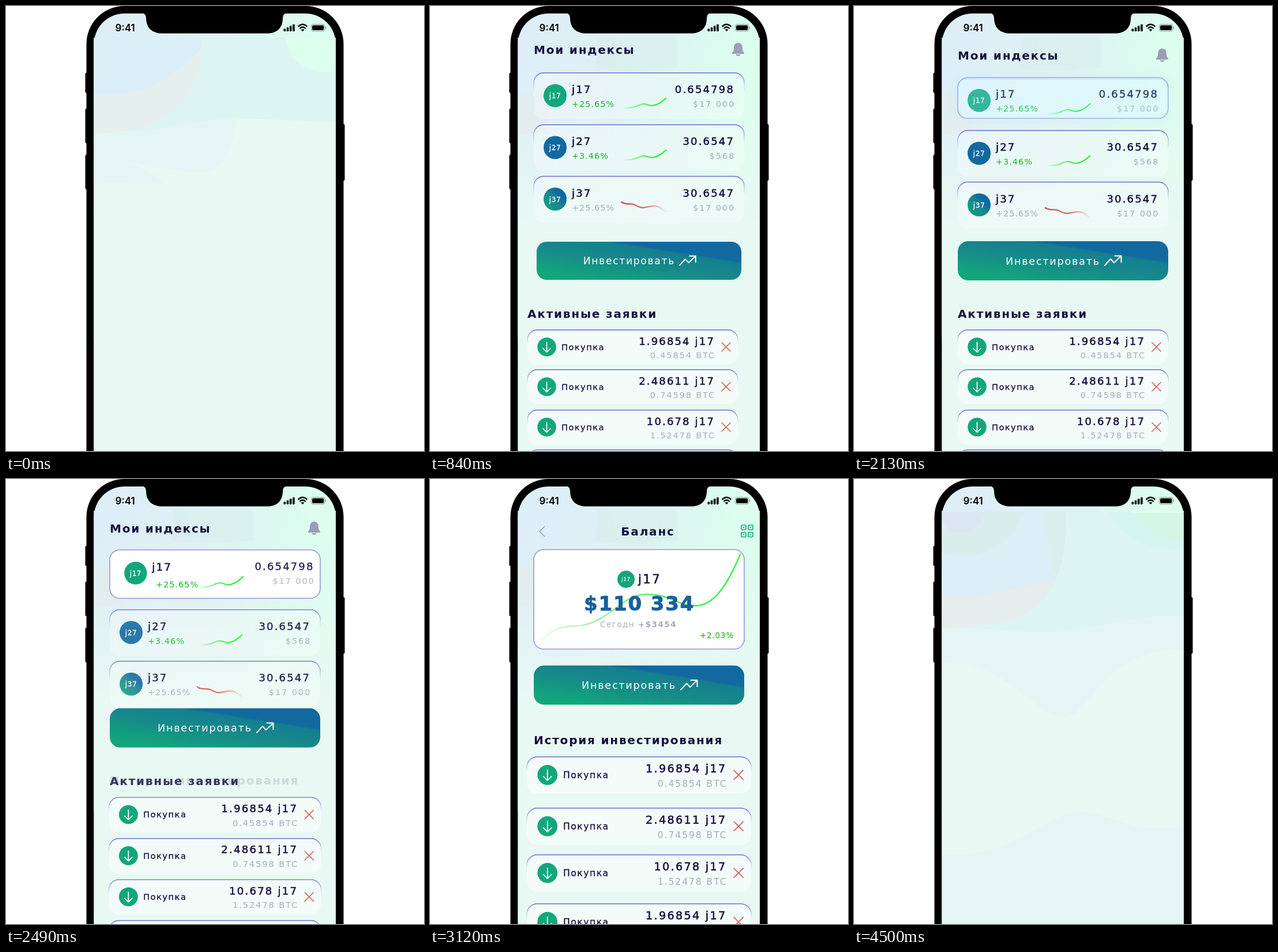
Write an HTML page that moves like this. It is 725 by 772 pixels and loops after 4620 ms.

```html
<!DOCTYPE html>
<html lang="ru">
<head>
<meta charset="utf-8">
<title>Индексы</title>
<style>
html, body { margin: 0; width: 100%; height: 100%; overflow: hidden; background: #fff; }
svg { display: block; width: 725px; height: 772px; }
text { font-family: "DejaVu Sans", sans-serif; fill: #160f40; }
.h { font-weight: 700; font-size: 20px; letter-spacing: .09em; }
.m { font-size: 18px; letter-spacing: .12em; stroke: #160f40; stroke-width: .5px; }
.s { font-size: 14.6px; letter-spacing: .1em; stroke: #160f40; stroke-width: .3px; }
.l { font-size: 14.6px; letter-spacing: .125em; fill: #a5abb9; }
.p { font-size: 14.4px; letter-spacing: .07em; }
.b { font-size: 17.6px; letter-spacing: .1em; fill: #fff; }
.t { font-size: 12px; letter-spacing: .05em; fill: #fff; stroke: #fff; stroke-width: .3px; text-anchor: middle; }
.big { font-size: 34px; font-weight: 700; letter-spacing: .055em; fill: #17609c; stroke: #17609c; stroke-width: .9px; }
.clock { font: 600 17px Inter, sans-serif; fill: #000; }
.e { text-anchor: end; }
.line { fill: none; stroke-linecap: round; stroke-linejoin: round; }
</style>
</head>
<body>
<svg id="stage" viewBox="0 0 725 772"></svg>
<script>
const LOOP = 4620, STEP = 30;
const GREEN = '#12a77a', BLUE = '#1169a0';
const names = ['j17', 'j27', 'j37'];

const txt = (x, y, s, cls, more = '') => `<text x="${x}" y="${y}" class="${cls}" ${more}>${s}</text>`;
const path = (d, fill) => `<path d="${d}" fill="${fill}"/>`;
const line = (d, color, w, more = '') => `<path class="line" d="${d}" stroke="${color}" stroke-width="${w}" ${more}/>`;
const rect = (x, y, w, h, r, fill, more = '') =>
  `<rect x="${x}" y="${y}" width="${w}" height="${h}" rx="${r}" fill="${fill}" ${more}/>`;
const oval = (x, y, rx, ry, fill) => `<ellipse cx="${x}" cy="${y}" rx="${rx}" ry="${ry}" fill="${fill}"/>`;
const grad = (id, coords, stops, units = 'objectBoundingBox') =>
  `<linearGradient id="${id}" gradientUnits="${units}" ${coords}>` +
  stops.map(([o, c, a = 1]) => `<stop offset="${o}" stop-color="${c}" stop-opacity="${a}"/>`).join('') +
  '</linearGradient>';

const defs = `<defs>
  <clipPath id="screen"><rect x="152.5" y="55" width="419.5" height="717"/></clipPath>
  ${grad('across', 'x1="0" x2="1"', [[0, '#dceef8'], [.3, '#dfeff6'], [.55, '#dcf3f1'], [.8, '#dcfaf0'], [1, '#dcffee']])}
  ${grad('down', 'x1="0" x2="0" y1="0" y2="1"', [[0, '#e8f8f3', 0], [.25, '#e8f8f3', .15], [.62, '#e8f8f3', 1]])}
  ${grad('edge', 'x1="0" x2="0" y1="0" y2="1"', [[0, '#6b70cc'], [.12, '#8589d6', .9], [.4, '#a5a8e4', 0]])}
  ${grad('cta', 'x1="0" y1="68" x2="19.7" y2="-55"', [[0, '#11a878'], [.14, '#12a57b'], [.46, '#17898a'], [.69, '#147f90'], [.72, BLUE], [1, BLUE]], 'userSpaceOnUse')}
  ${grad('duo', 'x1="0" y1="1" x2="1" y2="0"', [[0, GREEN], [.45, '#19888c'], [.7, BLUE], [1, BLUE]])}
  ${grad('rise', 'x1="0" x2="1"', [[0, '#3ee84a', .1], [.35, '#3ee84a', .65], [.75, '#2df53a'], [1, '#2df53a']])}
  ${grad('fall', 'x1="0" x2="1"', [[0, '#d4524f'], [.5, '#d4625f', .9], [1, '#d4625f', .1]])}
  <radialGradient id="soft"><stop offset=".9868" stop-color="#fff"/><stop offset="1" stop-color="#fff" stop-opacity="0"/></radialGradient>
  <mask id="sweep" maskUnits="userSpaceOnUse" x="0" y="0" width="725" height="772">
    <circle id="disc" cx="2600" cy="430" r="2175" fill="url(#soft)"/>
  </mask>
  <filter id="glow" x="-10%" y="-30%" width="120%" height="160%"><feGaussianBlur stdDeviation="4"/></filter>
</defs>`;

const phone = [[137.5, 116, 35], [137.5, 178, 60], [137.5, 258, 60], [580, 205, 98]]
  .map(([x, y, h]) => rect(x, y, 7.5, h, 2, '#000')).join('') +
  rect(139.5, 0, 446, 900, 66, '#000') +
  rect(152.5, 13, 419.5, 900, 53, 'url(#across)') +
  path('M235 12Q243 13 243 21C243 38 254 47.5 270 47.5H453C470 47.5 480 38 480 21Q480 13 488 12Z', '#000');

const status = txt(189.5, 43.5, '9:41', 'clock') +
  [0, 1, 2, 3].map(i => rect(481.5 + i * 5.2, 39.5 - i * 2.6, 3.6, 4.5 + i * 2.6, 1, '#000')).join('') +
  line('M507.5 35Q514.5 28.5 521.5 35', '#000', 2.6, 'stroke-linecap="butt"') +
  line('M510.3 38.4Q514.5 34.5 518.7 38.4', '#000', 2.5) +
  path('M511.8 41.2Q514.5 39 517.2 41.2L514.5 44Z', '#000') +
  rect(529.3, 31.8, 23.6, 12, 3.6, 'none', 'stroke="#000" stroke-opacity=".4"') +
  rect(531, 33.5, 20.2, 8.6, 2, '#000') + path('M554.3 35.8Q557 37.8 554.3 39.8Z', '#777');

const backdrop = rect(152, 55, 421, 717, 0, '#e8f8f3') +
  rect(152, 55, 421, 520, 0, 'url(#across)') + rect(152, 55, 421, 520, 0, 'url(#down)') +
  path('M290 55H430V107H410Q350 116 288 108Z', 'rgba(212,236,230,.4)') +
  path('M152 153H205V222H152Z', 'rgba(232,236,234,.55)');

const calm = rect(152, 57, 421, 715, 0, '#e8f8f2') +
  path('M152 221C230 222 310 196 400 195C396 240 376 278 352 288C310 292 260 275 208 274C240 280 262 294 275 309Q220 304 152 307Z', '#e5f5f7') +
  path('M152 57H573V200C500 201 450 194 395 195C330 199 280 214 230 216L152 222Z', '#dcf5f2') +
  path('M152 57H340C342 150 290 222 152 221Z', '#e5efee') +
  path('M152 57H340V71C285 132 235 160 152 153Z', '#dceef7') +
  oval(554, 52, 68, 63, '#dcffee') +
  rect(152, 55, 153, 3, 0, '#dceef7') + rect(305, 55, 100, 2, 0, '#d9efea') + rect(405, 55, 80, 2, 0, '#d4f4ee');

const dusk = rect(152, 57, 421, 715, 0, '#e5f5f6') +
  path('M152 318C270 316 315 414 364 414C408 414 430 292 573 296V604C470 615 450 578 390 578C330 578 290 656 152 652Z', '#e8f8f2') +
  path('M152 57H573V237C460 236 420 266 325 266C280 266 240 258 152 259Z', '#dcf5f2') +
  path('M152 57H368C368 200 330 259 152 259Z', '#e5eeed') +
  path('M152 57H333C333 100 338 140 353 174C290 188 240 205 152 203Z', '#dceef6') +
  path('M333 57H368Q368 130 352 168Q333 120 333 57Z', '#d8efeb') +
  path('M152 57H295C282 108 220 145 152 127Z', '#d9eeec') +
  path('M153 57H226C220 100 165 103 153 73Z', '#dce6f0') +
  path('M443 57H573V120C510 128 464 100 443 57Z', '#d5f5ee') +
  path('M488 57H573V102C535 108 502 86 488 57Z', '#d5f6e4') +
  rect(480, 55, 93, 4, 0, '#dcffee') + rect(152, 55, 180, 2, 0, '#dceef7');

const bell = path('M534.5 74C540 74 542 78 542 83C542 88 543 89 545 91V93H524V91C526 89 527 88 527 83C527 78 529 74 534.5 74ZM530.5 94H538.5Q537.5 97 534.5 97T530.5 94Z', '#9b9fb3');

// sparkline of the first card and the chart it grows into, as x, y pairs
const small = [337, 187, 343, 187, 349, 187, 355, 185, 362, 183, 366, 179, 372, 180, 379, 181, 383, 185, 390, 182, 397, 180, 403, 176, 409, 170];
const large = [191, 287, 205, 262, 225, 256, 252, 255, 310, 253, 330, 200, 376, 200, 418, 200, 428, 220, 460, 220, 492, 220, 515, 185, 538, 131];
const curvePath = v => `M${v[0]} ${v[1]}C${v.slice(2).join(' ')}`;

const cardBox = rect(180, 0, 365, 80, 17, 'rgba(255,255,255,.27)', 'stroke="url(#edge)" stroke-width="1.5"');
const badge = (name, fill) => `<circle r="20" fill="${fill}"/>` + txt(0, 4.5, name, 't');
const card = (id, name, fill, pct, pctColor, sum, usd, spark) => `<g id="${id}">${cardBox}
  <g transform="translate(217 39.5)">${badge(name, fill)}</g>
  ${txt(246, 35, name, 'm')}${txt(246, 59, pct, 'p', `style="fill:${pctColor}"`)}
  ${txt(528, 35, sum, 'm e')}${txt(529, 59, usd, 'l e')}${spark}</g>`;
const riseLine = line(curvePath(small), 'url(#rise)', 2.4, 'transform="translate(0 -126)"');
const fallLine = line('M332 44.5C338 50 346 46 354 49C362 53 366 55 372 54C380 53 388 50 394 52C400 54 404 58 408 61', 'url(#fall)', 2.4);

const row = i => `<g id="row${i}">
  ${rect(0, 0, 365, 60, 17, 'rgba(255,255,255,.45)', 'stroke="url(#edge)" stroke-width="1.4"')}
  <circle cx="33.5" cy="29.5" r="16.3" fill="${GREEN}"/>
  ${line('M33.5 21.5V38M27 32L33.5 38.5L40 32', '#fff', 1.7)}
  ${txt(59, 34.5, 'Покупка', 's')}
  ${txt(325, 25.5, ['1.96854', '2.48611', '10.678', '1.96854'][i] + ' ' + names[0], 'm e')}
  ${txt(326, 49, ['0.45854', '0.74598', '1.52478', '0.45854'][i] + ' BTC', 'l e')}
  ${line('M337 22L352 37M352 22L337 37', '#d65f5c', 1.6)}</g>`;

const first = `<g id="first">
  <rect id="box" x="180" width="365" rx="17" fill="rgba(255,255,255,.27)" stroke="url(#edge)" stroke-width="1.5"/>
  <rect id="sheetBox" x="180" width="365" rx="17" fill="#fff" stroke="#9896d8" stroke-width="1.6"/>
  <path id="curve" class="line" stroke="url(#rise)" stroke-width="2.4"/>
  <g id="badge">${badge(names[0], GREEN)}</g>
  <g id="label">${txt(0, 6.5, names[0], 'm')}</g>
  <g id="pct">${txt(0, 5, '+25.65%', 'p', 'style="fill:#12b81b"')}</g>
  <g id="pct2">${txt(0, 5, '+2.03%', 'p', 'style="fill:#2fc436;font-size:13.3px;stroke:#2fc436;stroke-width:.3px"')}</g>
  <g id="sums">${txt(528, 161, '0.654798', 'm e')}${txt(529, 185, '$17 000', 'l e')}</g>
  <g id="total">${txt(267, 228, '$110 334', 'big')}
    ${txt(295, 257, 'Сегодн <tspan font-weight="700">+$3454</tspan>', 'l', 'style="font-size:13.5px;letter-spacing:.11em"')}</g>
  <g id="press">
    <rect x="174" y="121" width="377" height="79" rx="21" fill="none" stroke="#b6eef6" stroke-width="7" opacity=".5" filter="url(#glow)"/>
    <rect x="179.5" y="126.5" width="365" height="68" rx="16" fill="rgba(156,236,250,.6)" stroke="#83aede" stroke-width="1.6"/>
  </g></g>`;

const square = (x, y) => rect(x, y, 8, 8, 1.5, 'none', `stroke="${GREEN}" stroke-width="1.7"`) + rect(x + 3, y + 3, 2, 2, 0, GREEN);

document.getElementById('stage').innerHTML = defs + phone + `
<g clip-path="url(#screen)">
  ${backdrop}
  <g id="calm">${calm}</g>
  <g id="app">
    <g id="top">
      <g id="head">${txt(180, 93, 'Мои индексы', 'h')}${bell}</g>
      ${card('second', names[1], BLUE, '+3.46%', '#12b81b', '30.6547', '$568', riseLine)}
      ${card('third', names[2], 'url(#duo)', '+25.65%', '#a5abb9', '30.6547', '$17 000', fallLine)}
      ${first}
    </g>
    <g id="list">
      <g id="active">${txt(180, 0, 'Активные заявки', 'h')}</g>
      <g id="history">${txt(180, 0, 'История инвестирования', 'h')}</g>
      ${[0, 1, 2, 3].map(row).join('')}
    </g>
    <g id="cta">${rect(0, 0, 365, 68, 18, 'url(#cta)')}
      ${txt(83, 40.5, 'Инвестировать', 'b')}
      ${line('M255 42L265 31L271 37.5L283.5 25.5M272.5 25.5H283.5V36.5', '#fff', 2)}</g>
    <g id="detail">${txt(378, 98, 'Баланс', 'h', 'text-anchor="middle"')}
      ${line('M198.5 82.5L190 91L198.5 99.5', '#9094a6', 1.4)}
      ${[[540, 80], [552, 80], [540, 92.5], [552, 92.5]].map(a => square(...a)).join('')}</g>
  </g>
  <g id="veil" mask="url(#sweep)">${dusk}
    <g id="tint">${rect(152, 57, 421, 715, 0, '#2a80a0')}${path('M152 57L573 60V268Q480 264 400 276L152 272Z', '#2d8192')}</g></g>
</g>` + status;

const el = {};
document.querySelectorAll('#stage [id]').forEach(n => el[n.id] = n);
const set = (id, attrs) => { for (const k in attrs) el[id].setAttribute(k, attrs[k]); };
const move = (id, x, y, s = 1) => set(id, { transform: `translate(${x} ${y}) scale(${s})` });
const fade = (id, a) => set(id, { opacity: a, visibility: a > 0 ? 'visible' : 'hidden' });
const mix = (a, b, p) => a + (b - a) * p;
const ramp = (v, a, b) => Math.min(1, Math.max(0, (v - a) / (b - a)));
const easeOut = (u, n) => 1 - Math.pow(1 - u, n);
const easeInOut = (u, n) => u < .5 ? Math.pow(2 * u, n) / 2 : 1 - Math.pow(2 - 2 * u, n) / 2;

const rowTops = [[562, 482], [631, 571], [701, 652], [770, 737]];

function draw(t) {
  // entrance
  const left = 1 - easeOut(ramp(t, 90, 1080), 2);
  fade('calm', 1 - ramp(t, 90, 570));
  fade('app', ramp(t, 90, 510));
  move('top', 0, -170 * left);
  move('list', -187 * left, 0);

  // tap, then opening of the first card
  const down = ramp(t, 1500, 1680);
  const white = ramp(t, 1950, 2250);
  const p = easeInOut(ramp(t, 2250, 3120), 2.4);
  const q = Math.pow(p, 1.3);
  const lift = -3 * white * (1 - q);
  const y = mix(mix(126, 123, white), 122.5, p);
  const height = mix(mix(206, 195, down), 295, p) - y;
  set('box', { y, height });
  set('sheetBox', { y, height });
  fade('box', 1 - white);
  fade('sheetBox', white);
  fade('press', down * (1 - white));

  set('curve', { d: curvePath(small.map((a, i) => mix(a, large[i], p * p))) });
  move('badge', mix(217, 340, q), mix(165.5, 174, q) + lift, mix(1, .75, q));
  move('label', mix(246, 361, q), mix(154.5, 173.5, q) + lift, mix(1, 1.17, q));
  const px = mix(246, 468, q), py = mix(180, 271, q) + lift;
  move('pct', px, py);
  move('pct2', px, py);
  fade('pct', 1 - ramp(p, .3, .75));
  fade('pct2', ramp(p, .35, .85));
  move('sums', 55 * p, lift);
  fade('sums', 1 - ramp(p, .05, .6));
  fade('total', ramp(p, .25, 1));

  move('second', 0, 216 + 90 * p);
  move('third', 0, 305.5 + 90 * p);
  fade('second', 1 - p);
  fade('third', 1 - p);
  fade('head', 1 - ramp(p, .12, .6));
  fade('detail', ramp(p, .25, 1));

  const hy = mix(541, 460, p);
  move('active', 0, hy);
  move('history', 0, hy - 1.5 * (1 - p));
  fade('active', 1 - ramp(p, 0, .7));
  fade('history', p);
  rowTops.forEach(([a, b], i) => move('row' + i, mix(180, 168, p), mix(a, b, p), mix(1, 1.066, p)));

  const s = 1 - .46 * left;
  move('cta', 362.5 - 182.5 * s, mix(442, 357.5, p) - 34 * s, s);

  // blue sweep from the right
  const w = easeOut(ramp(t, 3840, 4500), 1.45);
  fade('veil', w > 0 ? 1 : 0);
  set('disc', { cx: mix(590, 85, w) + 2175 });
  fade('tint', 1 - w);
}

function tick() {
  draw(Math.floor(performance.now() % LOOP / STEP) * STEP);
  requestAnimationFrame(tick);
}
tick();
</script>
</body>
</html>
```
